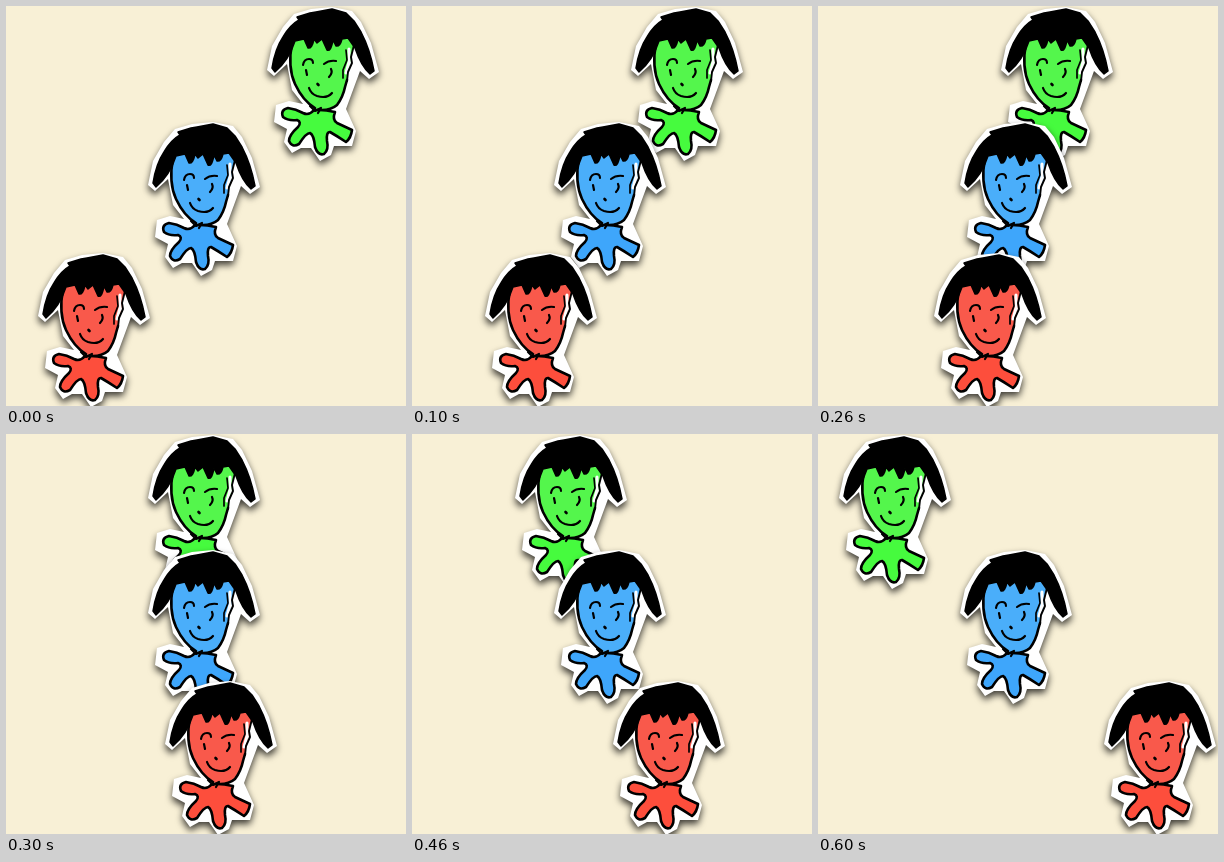
Animation, 400 px wide and 400 px high, one loop 700 ms. Source, as an HTML page:

```html
<!DOCTYPE html>
<html lang="en">
<head>
<meta charset="utf-8">
<title>Three paper heads</title>
<style>
  html, body { margin: 0; width: 100%; height: 100%; overflow: hidden; background: #f8f0d6; }
  svg { display: block; width: 100vw; height: 100vh; }
  .head { filter: drop-shadow(0 4px 3.5px rgba(0, 0, 0, .75)); }
  .green { --face: #54f64c; --hand: #46fb3e; animation: left 700ms step-end infinite; }
  .blue { --face: #4aaefa; --hand: #3ea6fb; }
  .red { --face: #f9594b; --hand: #fd4e3c; animation: right 700ms step-end infinite; }

  /* both outer heads hop sideways once every 100 ms */
  @keyframes left {
    0% { transform: translate(119px, -115px); }
    14.2857% { transform: translate(77px, -115px); }
    28.5714% { transform: translate(41px, -115px); }
    42.8571% { transform: translate(0, -115px); }
    57.1428% { transform: translate(-39px, -115px); }
    71.4285% { transform: translate(-80px, -115px); }
    85.7142%, 100% { transform: translate(-121px, -115px); }
  }
  @keyframes right {
    0% { transform: translate(-110px, 131px); }
    14.2857% { transform: translate(-69px, 131px); }
    28.5714% { transform: translate(-26px, 131px); }
    42.8571% { transform: translate(17px, 131px); }
    57.1428% { transform: translate(59px, 131px); }
    71.4285% { transform: translate(101px, 131px); }
    85.7142%, 100% { transform: translate(144px, 131px); }
  }
</style>
</head>
<body>
<svg viewBox="0 0 400 400">
  <defs>
    <g id="head" stroke-linecap="round" stroke-linejoin="round">
      <!-- paper cut-out -->
      <path fill="#fff" d="M169 123 L186 118 L207 116 L227 120 L236 131 L246 152 L254 181 L244 188
        L235 180 L221 218 L231 240 L227 255 L209 255 L206 264 L195 270 L186 257 L176 257
        L167 262 L159 251 L162 238 L149 231 L151 214 L164 210 L178 213 L167 199 L162 173
        L149 185 L142 179 L147 155 L158 136 Z"/>
      <!-- face -->
      <path fill="var(--face)" d="M168 146 C163 166 165 182 170 194 Q178 211 192 218 Q204 221 212 214
        Q219 203 222 188 L229 152 L215 138 L178 138 Z"/>
      <g fill="none" stroke="#000" stroke-width="2.6">
        <path d="M167 152 C164 168 165 182 170 193 Q178 210 190 217"/>
        <path d="M194 219 Q205 220 212 214 Q218 206 220 196 L222 189"/>
        <path d="M224 158 L224 171 L221 182" stroke="#fff" stroke-width="3"/>
        <path d="M229 154 L226 166 L227 172 L223 181 L222 190" stroke-width="1.9"/>
        <path d="M221 159 L222 169 L218 179 L218 187" stroke-width="1.7"/>
        <path d="M178 174 Q179 168 184 168 Q188 168 188 172" stroke-width="2.1"/>
        <path d="M199 173 Q204 169 211 170" stroke-width="2.1"/>
        <path d="M181 179 L182 184 M206 178 Q208 182 204 186" stroke-width="2.2"/>
        <path d="M192.5 193 L193.5 194"/>
        <path d="M184 197 Q186 203 192 205 Q202 208 207 202" stroke-width="2.2"/>
      </g>
      <!-- hair -->
      <path stroke="#000" stroke-width="1.5" d="M150 181 L147 177 Q150 158 158 146 Q165 134 174 129 L172 126
        L185 122 L191 121 L207 118 L221 122 L229 130 L236 141 Q245 158 249 180 L245 183
        Q236 175 230 157 L223 147 L217 148 Q215 156 211 155 L208 149 Q206 161 202 159 L197 148
        L192 152 L189 148 Q187 158 183 157 L179 148 L170 150 Q164 169 150 181 Z"/>
      <!-- hand -->
      <path fill="var(--hand)" stroke="#000" stroke-width="2.6" d="M189 219 Q184 225 178 222 Q171 218 163 217
        Q155 219 158 226 Q163 230 172 229 Q177 231 173 236 Q164 244 164 250 Q167 257 174 253
        Q181 242 185 242 Q189 244 190 256 Q193 265 199 263 Q204 259 202 250 Q201 241 205 241
        Q212 245 221 251 Q226 247 227 239 L212 232 Q207 229 210 221 Q201 219 194 219 Z"/>
      <path fill="none" stroke="#000" stroke-width="2.2" d="M185 215 L190 220 L196 217 L193 222"/>
    </g>
  </defs>
  <g class="green"><use class="head" href="#head"/></g>
  <g class="blue"><use class="head" href="#head"/></g>
  <g class="red"><use class="head" href="#head"/></g>
</svg>
</body>
</html>
```
